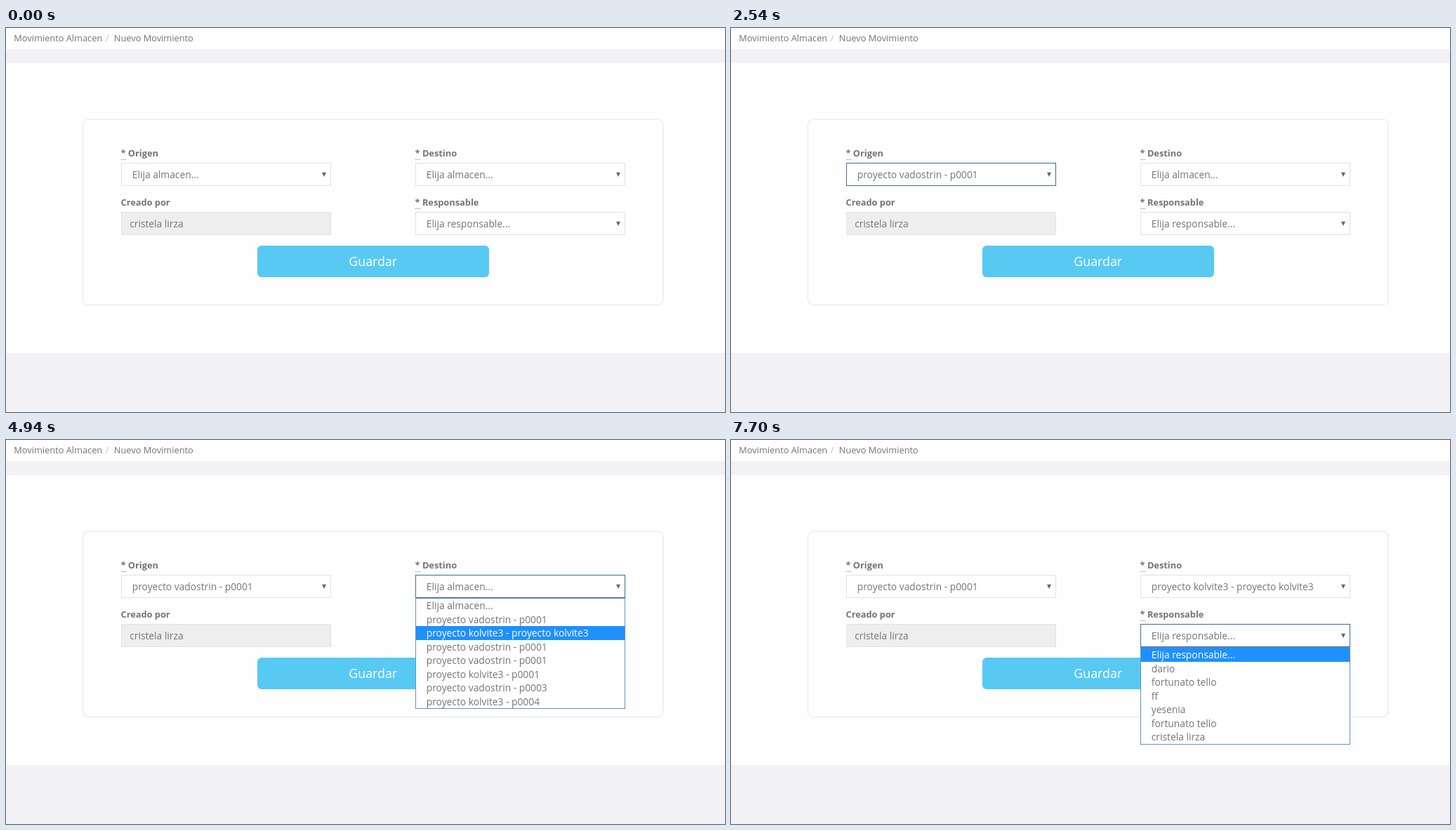
An HTML page that plays this animation: 1024x547 px, repeating every 8 s.

```html
<!DOCTYPE html>
<html lang="es">
<head>
<meta charset="utf-8">
<title>Nuevo Movimiento</title>
<style>
  html, body { margin: 0; width: 100%; height: 100%; overflow: hidden; background: #fff; }
  svg { display: block; width: 1024px; height: 547px; }
  text { font-family: "Open Sans", "Noto Sans", sans-serif; font-size: 13.8px; fill: #747474; white-space: pre; }
  .small { font-size: 12.8px; }
  .label { font-size: 12.8px; font-weight: 700; }
  .button { font-size: 17.8px; fill: #fff; text-anchor: middle; }
</style>
</head>
<body>
<svg id="stage" viewBox="0 0 1024 547"></svg>
<script>
const LOOP = 8000;
const ROW = 19.5;
const LINE = [226, 226, 229];
const FOCUS = [66, 103, 146];
const NS = "http://www.w3.org/2000/svg";
const stage = document.getElementById("stage");

const firm = "proyecto vadostrin";
const plant = "proyecto kolvite3";
const stores = [
  "Elija almacen...",
  firm + " - p0001",
  plant + " - " + plant,
  firm + " - p0001",
  firm + " - p0001",
  plant + " - p0001",
  firm + " - p0003",
  plant + " - p0004"
];
const people = [
  "Elija responsable...", "dario", "fortunato tello", "ff",
  "yesenia", "fortunato tello", "cristela lirza"
];

function add(parent, tag, attrs, content) {
  const node = document.createElementNS(NS, tag);
  for (const key in attrs) node.setAttribute(key, attrs[key]);
  if (content) node.textContent = content;
  parent.appendChild(node);
  return node;
}

const rect = (parent, x, y, width, height, fill, more) =>
  add(parent, "rect", { x, y, width, height, fill, ...more });

const text = (parent, x, y, content, cls = "") =>
  add(parent, "text", { x, y, class: cls }, content);

function label(x, y, name, required) {
  text(stage, x, y, (required ? "* " : "") + name, "label");
  if (required) add(stage, "path", {
    d: `M${Math.round(x)} ${Math.floor(y) + 4.5}h7`, stroke: "#808080", "stroke-dasharray": "1 1"
  });
}

function select(x, y, value) {
  const box = rect(stage, x + 0.5, y + 0.5, 298, 32, "#fff");
  const caption = text(stage, x + 15.8, y + 22.4, value);
  add(stage, "path", { d: `M${x + 286} ${y + 13.7}h6l-3 6.2z`, fill: "#666" });
  return { box, caption };
}

// Each list sits directly below its select.
function list(x, y, items, ghosts = []) {
  const group = add(stage, "g", {});
  const top = i => Math.round(y + 1 + i * ROW);
  rect(group, x + 0.5, y + 0.5, 298, top(items.length) - y, "#fff", { stroke: "#6490c5" });
  for (const g of ghosts) rect(group, ...g, "#f9f9f9");
  const bar = rect(group, x + 1, y + 1, 297, ROW, "#1e90ff");
  const rows = items.map((item, i) => text(group, x + 15.8, y + 16 + i * ROW, item));
  return {
    show(active) {
      group.style.display = active < 0 ? "none" : "";
      bar.setAttribute("y", top(active));
      bar.setAttribute("height", top(active + 1) - top(active));
      rows.forEach((row, i) => row.style.fill = i === active ? "#fff" : "");
    }
  };
}

// Page
rect(stage, 0, 0, 1024, 547, "#f1f1f6");
rect(stage, 0, 0, 1024, 30, "#fefefe");
rect(stage, 0, 50, 1024, 413, "#fefefe");
text(stage, 11.3, 18.6, "Movimiento Almacen", "small");
text(stage, 141.8, 18.6, "/", "small").style.fill = "#c4c4c4";
text(stage, 153.8, 18.6, "Nuevo Movimiento", "small");
rect(stage, 109.5, 130, 826.5, 264.5, "#fefefe", { rx: 8, stroke: "#e6e6e8" });

// Form
label(163.5, 183.3, "Origen", true);
label(582.6, 183.3, "Destino", true);
label(163.5, 253.4, "Creado por", false);
label(582.6, 253.4, "Responsable", true);
const origin = select(164, 192, stores[0]);
const target = select(583, 192, stores[0]);
const keeper = select(583, 262, people[0]);
rect(stage, 164.5, 262.5, 298, 32, "#eee", { stroke: "#e4e4e6" });
text(stage, 176.2, 283.6, "cristela lirza");
rect(stage, 358, 310, 330, 45, "#58c9f3", { rx: 6 });
text(stage, 522.7, 339.2, "Guardar", "button");

const originList = list(164, 225, stores, [[165, 263, 297, 32], [358, 310, 104, 45]]);
const targetList = list(583, 225, stores);
const keeperList = list(583, 295, people);

// Border fade, advancing once every 60 ms.
function fade(t, start, steps) {
  if (t < start) return 0;
  return steps[Math.min(Math.floor((t - start) / 60), steps.length - 1)];
}

function border(field, amount) {
  const rgb = LINE.map((c, i) => Math.round(c + (FOCUS[i] - c) * amount));
  field.box.setAttribute("stroke", `rgb(${rgb})`);
}

function draw(t) {
  const first = fade(t, 500, [0.25, 0.75, 1]);
  const second = fade(t, 3680, [0.2, 0.75, 1]);
  const third = fade(t, 7640, [0.4, 1]);
  border(origin, first - second);
  border(target, second - third);
  border(keeper, third);

  origin.caption.textContent = stores[t < 2540 ? 0 : 1];
  target.caption.textContent = stores[t < 5780 ? 0 : 2];

  originList.show(t < 500 || t >= 2540 ? -1 : t < 1820 ? 0 : 1);
  targetList.show(t < 3680 || t >= 5780 ? -1 : t < 4700 ? 0 : t < 4940 ? 1 : 2);
  keeperList.show(t < 7640 ? -1 : 0);
}

const began = performance.now();
function tick() {
  draw((performance.now() - began) % LOOP);
  requestAnimationFrame(tick);
}
tick();
</script>
</body>
</html>
```
